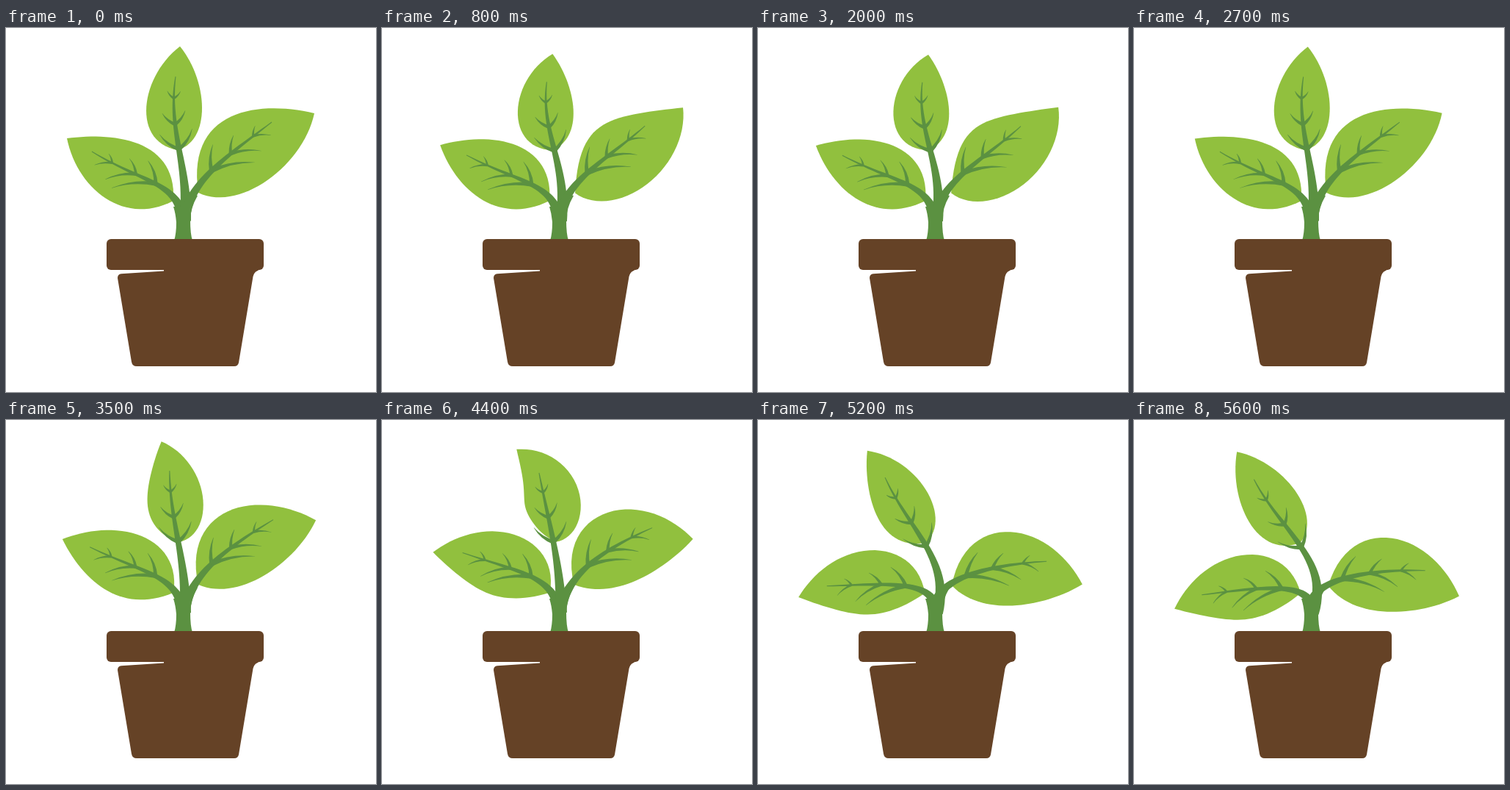
Animation of 504x495 px, one loop 6000 ms. Source, as an HTML page:

```html
<!DOCTYPE html>
<html lang="en">
<head>
<meta charset="utf-8">
<title>Potted plant</title>
<style>
  html, body { margin: 0; width: 100%; height: 100%; overflow: hidden; background: #fff; }
  svg { display: block; width: 504px; height: 495px; }
  .leaf { fill: #91c03e; }
  .stem { fill: #5b9141; }
  .pot { fill: #654226; }
</style>
</head>
<body>
<svg viewBox="0 0 504 495">
  <g id="leaves" class="leaf"></g>
  <g id="ribs" class="stem"></g>
  <path class="stem" d="M229 289Q232 280 232 264Q231 252 228 243L238 243L250 226L261 228Q251 245 251 262Q251 280 254 289Z"/>
  <g class="pot">
    <rect x="137" y="287" width="214" height="42" rx="6"/>
    <path d="M215 328V330.5L157 334.3Q152 335 152 340L171 454Q172 460 178 460H311Q316 460 317 455L336.5 338Q338 332 342 330.5L346 328Z"/>
  </g>
</svg>
<script>
// Each leaf has one resting shape. Poses are [tip turn, base turn, length],
// in degrees from rest; reach is the vein length on the left and right of the rib.
const REST = [0, 0, 1];
const LEAVES = [
  {
    base: [228, 235], tip: [83, 150],
    sides: [[145, 142, 233, 150], [97, 219, 161, 270]],
    rib: [241, 262, 236, 210, 185, 210, 117, 168],
    body: 4.4, reach: [60, 33],
    lift: [-5.7, 2, .99], sag: [-10, 10, 1], droop: [-37.4, -15, 1.03]
  },
  {
    base: [234, 166], tip: [237, 25],
    sides: [[183, 66, 170, 155], [275, 72, 280, 152]],
    rib: [244, 262, 249, 185, 220, 140, 231, 66],
    body: 5.8, reach: [33, 33],
    lift: [-1.9, -12, .88], sag: [-23.7, 14, .965], droop: [-36, -31, 1.07]
  },
  {
    base: [262, 224], tip: [420, 116],
    sides: [[345, 98, 245, 110], [405, 187, 318, 251]],
    rib: [243, 262, 248, 210, 300, 175, 362, 128],
    body: 5.4, reach: [36, 60],
    lift: [-6.7, 18, .965], sag: [12.1, -6, .905], droop: [38.9, 26, .935]
  }
];

const STEP = 100, LOOP = 6000, LAST = 5600;
const KEYS = [[0], [1425, 'lift'], [2850], [4200, 'sag'], [LAST, 'droop']];

const ease = u => (1 - Math.cos(Math.PI * u)) / 2;
const lerp = (a, b, k) => a + (b - a) * k;
const fmt = v => v.toFixed(2);
const outline = pts => 'M' + pts.map(p => p.map(fmt).join(' ')).join('L') + 'Z';

function turn([x, y], deg) {
  const a = deg * Math.PI / 180, c = Math.cos(a), s = Math.sin(a);
  return [x * c - y * s, x * s + y * c];
}

// Point and unit tangent of a cubic curve.
function onCurve(c, t) {
  const s = 1 - t;
  const at = k => s*s*s*c[k] + 3*s*s*t*c[k+2] + 3*s*t*t*c[k+4] + t*t*t*c[k+6];
  const slope = k => s*s*(c[k+2]-c[k]) + 2*s*t*(c[k+4]-c[k+2]) + t*t*(c[k+6]-c[k+4]);
  const dx = slope(0), dy = slope(1), len = Math.hypot(dx, dy);
  return { x: at(0), y: at(1), dx: dx / len, dy: dy / len };
}

function poseAt(leaf, ms) {
  let i = 0;
  while (i < KEYS.length - 2 && ms >= KEYS[i + 1][0]) i++;
  const [[from, a], [to, b]] = [KEYS[i], KEYS[i + 1]];
  const k = ease((ms - from) / (to - from));
  const start = leaf[a] || REST, end = leaf[b] || REST;
  return start.map((v, n) => lerp(v, end[n], k));
}

// Returns a function that carries a resting point along the bent leaf axis.
function bender({ base, tip, rib }, [tipTurn, baseTurn, length]) {
  const axis = [tip[0] - base[0], tip[1] - base[1]];
  const size = Math.hypot(...axis);
  const arm = turn([base[0] - rib[0], base[1] - rib[1]], baseTurn * .15);
  const foot = [rib[0] + arm[0], rib[1] + arm[1]];
  const end = turn(axis, tipTurn).map(v => v * length);
  const reach = length / 2 / Math.cos((baseTurn - tipTurn) * Math.PI / 180);
  const mid = turn(axis, baseTurn).map(v => v * reach);
  return (x, y) => {
    const rx = x - base[0], ry = y - base[1];
    const u = (rx * axis[0] + ry * axis[1]) / size ** 2;
    const v = (ry * axis[0] - rx * axis[1]) / size;
    const [px, py] = [0, 1].map(k => foot[k] + 2 * u * (1 - u) * mid[k] + u * u * end[k]);
    const [tx, ty] = [0, 1].map(k => (1 - 2 * u) * mid[k] + u * end[k]);
    const len = Math.hypot(tx, ty);
    return [px - ty / len * v, py + tx / len * v];
  };
}

function leafPath({ base, tip, sides }, bend) {
  const n = 30, pts = [];
  sides.forEach((side, s) => {
    const curve = s ? [...base, ...side.slice(2), ...side.slice(0, 2), ...tip]
                    : [...tip, ...side, ...base];
    for (let i = 0; i < n; i++) {
      const p = onCurve(curve, i / n);
      pts.push(bend(p.x, p.y));
    }
  });
  return outline(pts);
}

// The rib starts in the trunk; its lower handle swings against the leaf.
function bentRib({ rib }, bend, [tipTurn]) {
  const handle = bend(rib[4], rib[5]);
  return [
    rib[0], rib[1],
    rib[2] - (handle[0] - rib[4]), rib[3] + Math.abs(tipTurn) * .2,
    ...handle, ...bend(rib[6], rib[7])
  ];
}

const halfWidth = (t, body) =>
  .5 + body * (1 - t) ** .9 + (7.5 - body) * (1 - t) ** 4;

function ribPath(rib, body) {
  const left = [], right = [], n = 28;
  for (let i = 0; i <= n; i++) {
    const t = i / n, q = onCurve(rib, t), w = halfWidth(t, body);
    left.push([q.x - q.dy * w, q.y + q.dx * w]);
    right.unshift([q.x + q.dy * w, q.y - q.dx * w]);
  }
  return outline(left.concat(right));
}

// Pairs of tapered side veins, shorter towards the tip.
function veinsPath(rib, { body, reach }) {
  let d = '';
  for (let k = 0; k < 3; k++) {
    const t = .49 + .185 * k, q = onCurve(rib, t);
    const w = Math.min(3, .8 + halfWidth(t, body) * .65);
    reach.forEach((full, i) => {
      const side = i ? 1 : -1, len = full * (1 - .3 * k);
      const [dx, dy] = turn([q.dx, q.dy], side * (54 - full / 3));
      const bow = side * (.4 - full / 120) * len * 1.3;
      const spot = (along, off) =>
        fmt(q.x + dx * along * len - dy * off) + ' ' + fmt(q.y + dy * along * len + dx * off);
      d += `M${spot(0, w)}Q${spot(.5, bow + w * .6)} ${spot(1, .2)}` +
        `L${spot(1, -.2)}Q${spot(.5, bow - w * .6)} ${spot(0, -w)}Z`;
    });
  }
  return d;
}

function addPath(id) {
  const el = document.createElementNS('http://www.w3.org/2000/svg', 'path');
  document.getElementById(id).append(el);
  return el;
}

for (const leaf of LEAVES) {
  leaf.blade = addPath('leaves');
  leaf.stalk = addPath('ribs');
  leaf.veins = addPath('ribs');
}

function draw(ms) {
  for (const leaf of LEAVES) {
    const pose = poseAt(leaf, ms);
    const bend = bender(leaf, pose);
    const rib = bentRib(leaf, bend, pose);
    leaf.blade.setAttribute('d', leafPath(leaf, bend));
    leaf.stalk.setAttribute('d', ribPath(rib, leaf.body));
    leaf.veins.setAttribute('d', veinsPath(rib, leaf));
  }
}

const start = performance.now();
function tick() {
  const ms = (performance.now() - start) % LOOP;
  draw(Math.min(LAST, Math.floor(ms / STEP) * STEP));
  requestAnimationFrame(tick);
}
tick();
</script>
</body>
</html>
```
